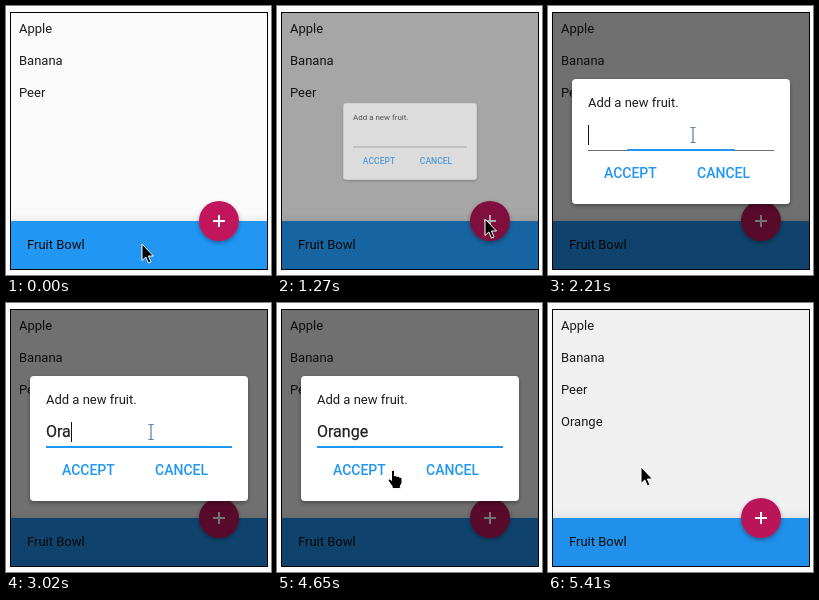
An HTML page for the animation above (6100 ms loop, 265 by 269 pixels).

```html
<!DOCTYPE html>
<html lang="en">
<head>
<meta charset="utf-8">
<title>Fruit Bowl</title>
<style>
  html, body { margin: 0; width: 100%; height: 100%; overflow: hidden; background: #fdfdfd; }
  svg { display: block; width: 100%; height: 100%; }
  text { font: 13px Roboto, sans-serif; fill: #1c1c1c; white-space: pre; }
  .button { font-size: 14px; font-weight: 500; fill: #2196f3; }
  #entry { font-size: 16px; fill: #212121; stroke: #212121; stroke-width: .25px; }
  .pointer { fill: #000; stroke: #fff; stroke-width: 1px; stroke-linejoin: round; }
</style>
</head>
<body>
<svg viewBox="0 0 265 269">
  <defs>
    <filter id="lift" x="-30%" y="-30%" width="160%" height="170%">
      <feDropShadow dx="0" dy="2" stdDeviation="2" flood-opacity=".35"/>
    </filter>
    <linearGradient id="edge" x1="0" y1="0" x2="0" y2="1">
      <stop offset="0" stop-opacity="0"/>
      <stop offset="1" stop-opacity=".05"/>
    </linearGradient>
  </defs>

  <rect x="5" y="7" width="256" height="256" fill="#fafafa"/>
  <g id="list"></g>
  <rect x="5" y="207" width="256" height="8" fill="url(#edge)"/>
  <rect x="5" y="215" width="256" height="48" fill="#2196f3"/>
  <text x="21" y="243" style="fill:#0c0c0c">Fruit Bowl</text>
  <circle cx="213" cy="215" r="20" fill="#c2185b" filter="url(#lift)"/>
  <circle id="glow" cx="213" cy="215" r="20" fill="#fff"/>
  <path d="M207 215h12M213 209v12" stroke="#fff" stroke-width="2"/>
  <rect id="shade" x="5" y="7" width="256" height="256"/>
  <rect x="4.5" y="6.5" width="257" height="257" fill="none" stroke="#000"/>

  <g id="dialog">
    <rect x="24" y="73" width="218" height="125" rx="4" fill="#fff" filter="url(#lift)"/>
    <text x="40" y="101">Add a new fruit.</text>
    <text id="entry" x="40" y="134"></text>
    <rect id="caret" y="119" width="1" height="20" fill="#111"/>
    <rect x="40" y="144" width="186" height="1" fill="#6e6e6e"/>
    <rect id="focus" y="143" height="2" fill="#2196f3"/>
    <rect id="hoverAccept" x="40" y="153" width="85" height="29" rx="2" fill="#e9f4fe"/>
    <rect id="hoverCancel" x="133" y="153" width="85" height="29" rx="2" fill="#e9f4fe"/>
    <text class="button" x="56" y="172">ACCEPT</text>
    <text class="button" x="149" y="172">CANCEL</text>
  </g>

  <g id="cursor">
    <path id="arrow" class="pointer" d="M0 0V16.5L3.8 13L6.4 19L9 17.9L6.4 12H11.5Z"/>
    <path id="hand" class="pointer" d="M-1.5 1Q0 -1 1.5 1V6Q3 5 4 6.5Q5.5 5.7 6.5 7.2Q8.5 6.7 9 8.8V13L7.3 16V18.5H-.8V16.5L-4.8 10.8Q-5 8.5 -3 9L-1.5 10.5Z"/>
    <path id="beam" d="M-2.5 -7.5H-.8L0 -6.8L.8 -7.5H2.5M0 -6.8V6.8M-2.5 7.5H-.8L0 6.8L.8 7.5H2.5" fill="none" stroke="#5b7f9e" stroke-width="1.2"/>
  </g>
</svg>
<script>
const LOOP = 6100, REST = 5410, WORD = 'Orange';
const $ = id => document.getElementById(id);
const set = (id, attrs) => {
  for (const k in attrs) $(id).setAttribute(k, attrs[k]);
};
const clamp = u => Math.min(1, Math.max(0, u));
const ramp = (t, start, length) => clamp((t - start) / length);
const smooth = u => u * u * (3 - 2 * u);
const easeOut = u => Math.sin(u * Math.PI / 2);
const pulse = (t, on, off, length) => ramp(t, on, length) - ramp(t, off, length);
const show = (id, on) => set(id, { visibility: on ? 'visible' : 'hidden' });

// time, x, y of the pointer's hot spot
const route = [
  [130, 136, 238], [730, 213, 220], [1080, 214, 220], [1240, 208, 213],
  [1300, 208, 213], [1660, 150, 143], [1940, 145, 129], [4400, 145, 129],
  [4650, 116, 167], [4900, 94, 166], [5200, 93, 164]
];
const keyTimes = [2680, 2860, 3020, 3460, 3620, 3750];

const fruits = ['Apple', 'Banana', 'Peer', WORD].map((name, i) => {
  const row = document.createElementNS('http://www.w3.org/2000/svg', 'text');
  row.setAttribute('x', 13);
  row.setAttribute('y', 27 + 32 * i);
  row.textContent = name;
  $('list').append(row);
  return row;
});

function pointerAt(t) {
  const i = route.findIndex(p => p[0] > t);
  if (i === 0) return route[0].slice(1);
  if (i < 0) return route[route.length - 1].slice(1);
  const [t0, x0, y0] = route[i - 1], [t1, x1, y1] = route[i];
  const u = smooth((t - t0) / (t1 - t0));
  return [x0 + (x1 - x0) * u, y0 + (y1 - y0) * u];
}

function drawCursor(t) {
  const [x, y] = pointerAt(t);
  let kind = 'arrow';
  if (t < 1130 && Math.hypot(x - 213, y - 215) < 20) kind = 'hand';
  else if (t > 1400 && t < 5120) {
    if (y > 153 && y < 182) kind = 'hand';
    else if (y > 117 && y < 147) kind = 'beam';
  }
  for (const id of ['arrow', 'hand', 'beam']) show(id, id === kind);
  set('cursor', { transform: `translate(${x} ${y})` });
}

function drawDialog(t) {
  const opened = easeOut(ramp(t, 1120, 360));
  const size = opened * (1 - smooth(ramp(t, 5040, 350)));
  set('shade', { opacity: .55 * opened * (1 - smooth(ramp(t, 5040, 440))) });
  show('dialog', size > .01);
  set('dialog', {
    opacity: size,
    transform: `translate(133 135.5) scale(${Math.max(size, .01)}) translate(-133 -135.5)`
  });

  const typed = keyTimes.filter(k => t >= k).length;
  $('entry').textContent = WORD.slice(0, typed);
  const end = typed ? $('entry').getComputedTextLength() : 0;
  set('caret', {
    x: Math.round(40 + end),
    opacity: (t >= 2000 && t < 4220) || (t >= 4720 && t < 4880) ? 1 : 0
  });

  const width = 186 * smooth(ramp(t, 1990, 400));
  set('focus', { x: 133 - width / 2, width, opacity: 1 - ramp(t, 4860, 200) });
  set('hoverCancel', { opacity: pulse(t, 1450, 1680, 180) });
  set('hoverAccept', { opacity: ramp(t, 4650, 200) });
}

function render(t) {
  fruits[3].setAttribute('visibility', t >= 5040 ? 'visible' : 'hidden');
  set('glow', { opacity: .12 * pulse(t, 600, 1120, 150) });
  drawDialog(t);
  drawCursor(t);
}

const start = performance.now();
function tick() {
  render(Math.min((performance.now() - start) % LOOP, REST));
  requestAnimationFrame(tick);
}
tick();
</script>
</body>
</html>
```
